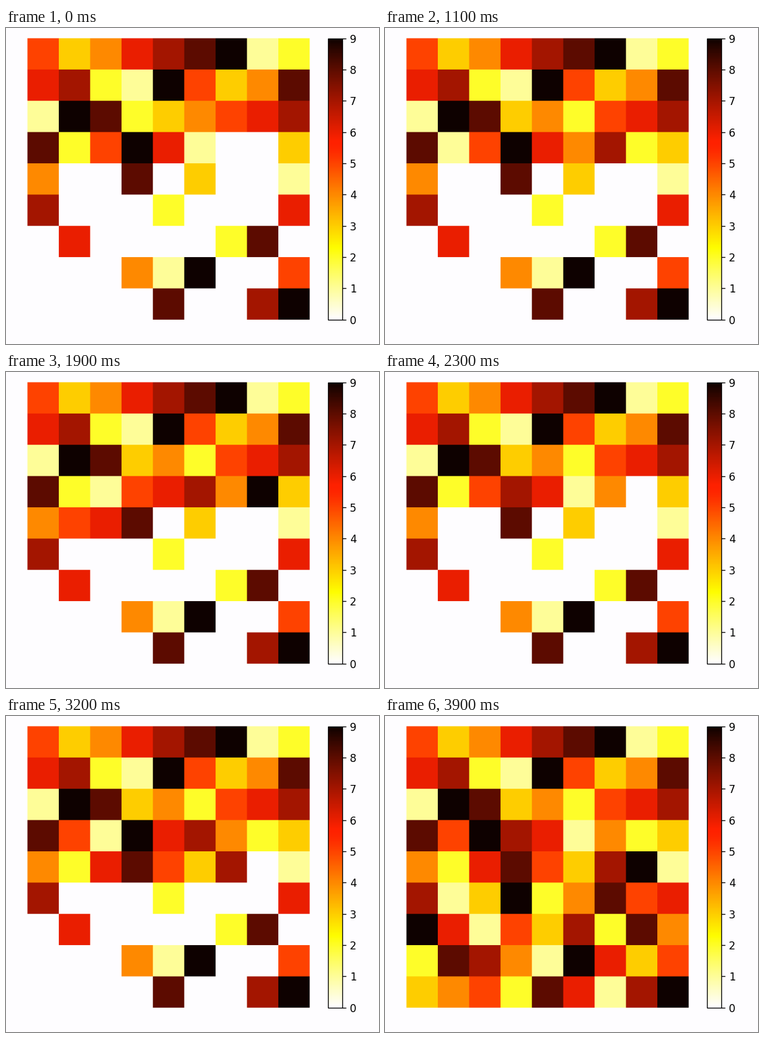
A matplotlib script that plays this animation: 600x509 px, repeating every 4 s.

```python
import numpy as np
import matplotlib.pyplot as plt
from matplotlib.animation import FuncAnimation
from matplotlib.cm import ScalarMappable
from matplotlib.colors import ListedColormap, Normalize, to_rgb
from matplotlib.lines import Line2D

W, H, DPI = 600, 509, 100
FRAMES, INTERVAL = 40, 100
PT = 72 / DPI
PAPER = "#fefdff"
LEFT, RIGHT, TOP, BOTTOM = 34.5, 488.5, 16.5, 469.8

PUZZLE = [
    "530070000", "600195000", "098000060",
    "800060003", "400803001", "700020006",
    "060000280", "000419005", "000080079",
]
SOLVED_ROWS = "534678912" "672195348"

# Waypoints of the search: time in ms, third to fifth row, which visit
WAYPOINTS = [
    (0, "198234567" "825961003" "400803001", -1),
    (500, "198234567" "851960003" "400803001", -1),
    (1100, "198342567" "815964723" "400803001", -1),
    (1900, "198342567" "821567493" "456803001", 0),
    (2800, "198342567" "850060003" "400803001", 0),
    (3500, "198342567" "859761423" "400803001", 0),
]


def peers_of(cell):
    r, c = divmod(cell, 9)
    return [
        k for k in range(81)
        if k != cell and (k // 9 == r or k % 9 == c
                          or (k // 27, k % 9 // 3) == (r // 3, c // 3))
    ]


PEERS = [peers_of(k) for k in range(81)]


def solve(grid, log):
    """Backtrack in reading order, logging every placement and removal."""
    if 0 not in grid:
        return True
    cell = grid.index(0)
    taken = {grid[k] for k in PEERS[cell]}
    for digit in range(1, 10):
        if digit in taken:
            continue
        grid[cell] = digit
        log.append("".join(map(str, grid)))
        if solve(grid, log):
            return True
        grid[cell] = 0
        log.append("".join(map(str, grid)))
    return False


log = []
solve([int(d) for d in "".join(PUZZLE)], log)

times, steps = [], []
for ms, rows, visit in WAYPOINTS:
    state = SOLVED_ROWS + rows + "".join(PUZZLE[5:])
    hits = [i for i, logged in enumerate(log) if logged == state]
    times.append(ms)
    steps.append(hits[visit])
times.append((FRAMES - 1) * INTERVAL)
steps.append(len(log) - 1)


def screen_heat():
    """Reversed hot map, a little lighter and with reds leaning to orange."""
    rgb = plt.get_cmap("hot_r")(np.arange(256))[:, :3] ** 0.91
    light = rgb ** 2.2
    light[:, 1] += 0.011 * (light[:, 0] - light[:, 1])
    return ListedColormap(light ** (1 / 2.2) * to_rgb(PAPER))


def coverage(start, end, size):
    """Share of each pixel covered by each of nine equal cells."""
    edges = np.linspace(start, end, 10)[:, None]
    px = np.arange(size)
    overlap = np.minimum(px + 1, edges[1:]) - np.maximum(px, edges[:-1])
    return overlap.clip(0, 1)


heat = screen_heat()
scale = Normalize(0, 9)
across = coverage(LEFT, RIGHT, W)
down = coverage(TOP, BOTTOM, H)
paper = np.array(to_rgb(PAPER))


def board(frame):
    step = int(round(np.interp(frame * INTERVAL, times, steps)))
    cells = np.array([int(d) for d in log[step]]).reshape(9, 9)
    ink = heat(scale(cells))[..., :3] - paper
    picture = paper + np.einsum("ry,rck,cx->yxk", down, ink, across,
                                optimize=True)
    return picture.clip(0, 1)


plt.rcParams["font.family"] = "DejaVu Sans"
fig = plt.figure(figsize=(W / DPI, H / DPI), dpi=DPI, facecolor=PAPER)

ax = fig.add_axes([0, 0, 1, 1])
ax.axis("off")
image = ax.imshow(board(0), interpolation="nearest", aspect="auto")

bar_left, bar_right = 518.1, 541.2
cax = fig.add_axes([bar_left / W, 1 - BOTTOM / H,
                    (bar_right - bar_left) / W, (BOTTOM - TOP - 0.1) / H])
bar = fig.colorbar(ScalarMappable(scale, heat), cax=cax, ticks=range(10))
bar.outline.set_linewidth(1.36 * PT)
cax.tick_params(length=5.9 * PT, width=1.36 * PT, pad=5.9 * PT,
                labelsize=17 * PT)

# Thin grey rule along the bottom edge
fig.add_artist(Line2D([0, 1], [0.5 / H] * 2, color="#c6c5c7", lw=PT))


def draw(frame):
    image.set_data(board(frame))
    return [image]


anim = FuncAnimation(fig, draw, frames=FRAMES, interval=INTERVAL,
                     repeat=True, repeat_delay=0)
plt.show()
```
